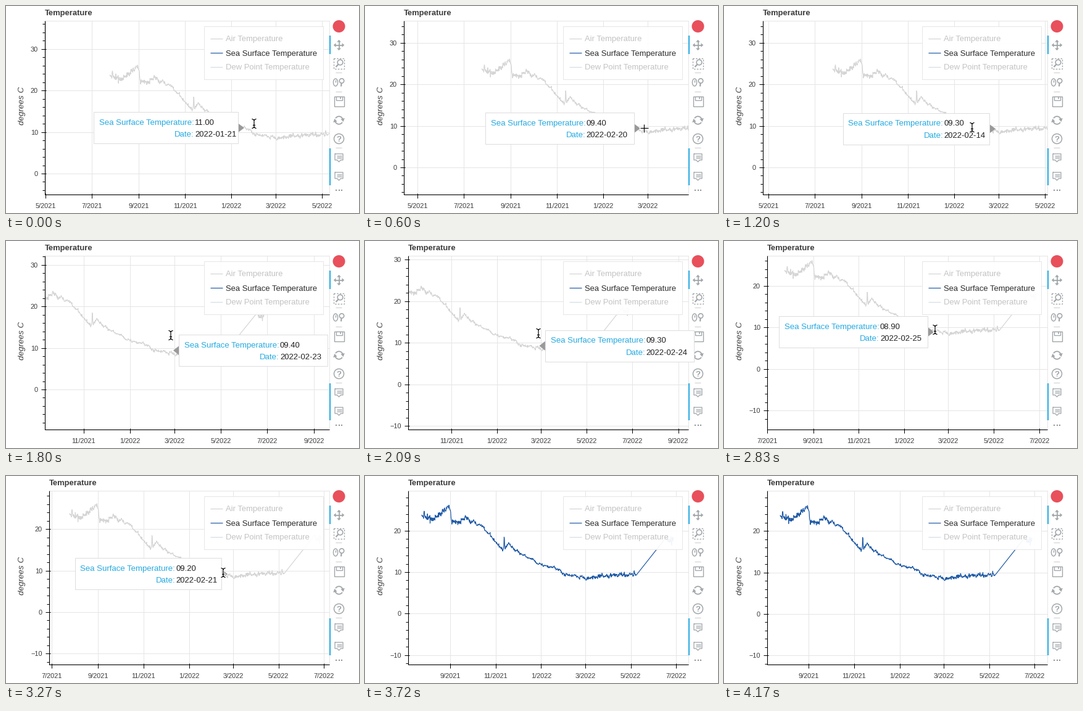
A matplotlib script that plays this animation: 572x336 px, repeating every 4.47 s.

```python
import numpy as np
import matplotlib.pyplot as plt
from matplotlib.animation import FuncAnimation
from matplotlib.patches import Circle, Polygon, Rectangle

W, H, DPI = 572, 336, 64
PT = 72 / DPI
LOOP, STEP, TICK = 4470, 149, 30
TOP, RIGHT, BOTTOM = 24, 524, 306
DEG = 6.74
INK, GRID, ICON, SKY = "#3c3c3c", "#e5e5e5", "#a1a6a9", "#26aae1"
MUTED, BLUE, FADED = "#d5d5d5", "#1f5aa6", "#c3c3c3"

plt.rcParams["font.family"] = "Liberation Sans"
fig = plt.figure(figsize=(W / DPI, H / DPI), dpi=DPI, facecolor="white")
ax = fig.add_axes([0, 0, 1, 1])
ax.set_xlim(0, W)
ax.set_ylim(H, 0)
ax.axis("off")


def stroke(x=(), y=(), color=ICON, lw=1.0, z=5, **kw):
    kw.setdefault("solid_capstyle", "butt")
    return ax.plot(x, y, color=color, lw=lw * PT, zorder=z, **kw)[0]


def label(x, y, s, size=11, color=INK, z=5, **kw):
    kw.setdefault("va", "baseline")
    return ax.text(x, y, s, fontsize=size * PT, color=color, zorder=z, **kw)


def box(x, y, w, h, fc="white", ec="none", z=5, lw=1, **kw):
    return ax.add_patch(Rectangle((x, y), w, h, fc=fc, ec=ec, zorder=z,
                                  lw=lw * PT, **kw))


def ring(x, y, r, lw=1.4):
    ax.add_patch(Circle((x, y), r, fc="none", ec=ICON, lw=lw * PT, zorder=5))


def shape(pts, color=ICON, z=5):
    return ax.add_patch(Polygon(pts, fc=color, ec="none", zorder=z))


def set_segments(line, segs):
    """Show separate segments (x0, y0, x1, y1) in one line artist."""
    xs, ys = [], []
    for x0, y0, x1, y1 in segs:
        xs += [x0, x1, np.nan]
        ys += [y0, y1, np.nan]
    line.set_data(xs, ys)


# ---- temperature series, days counted from the new year ----
NEW_YEAR = np.datetime64("2022-01-01")
TREND = np.array([
    (-160, 23.3), (-146, 22.8), (-132, 24.3), (-125, 26), (-122, 25.3),
    (-120, 21.9), (-111, 22), (-102, 23.2), (-92, 22), (-80, 21.2),
    (-52, 15.4), (-43, 16.6), (-38, 15.4), (-7, 12.6), (0, 11.6), (16, 11.2),
    (30, 9.6), (63, 8.3), (80, 9.1), (100, 9.2), (128, 9.5)])


def make_series():
    rng = np.random.RandomState(4)
    day = np.arange(-160.5, 127.8, 0.4)
    sigma = 0.12 + 0.32 * (day / 150) ** 2
    wander = np.convolve(rng.normal(size=day.size), np.ones(8) / 8, "same")
    temp = np.interp(day, *TREND.T) + 0.5 * wander
    temp += sigma * rng.normal(size=day.size)
    for at, rise in ((-157, 1.7), (-49.5, 3), (125, 0.9)):
        temp += rise * np.exp(-((day - at) / 0.5) ** 2)
    # steady climb over the gap, then a short noisy stretch
    later = np.arange(127.8, 178, 0.4)
    warm = np.minimum(9.35 + 0.227 * (later - 127.8), 18.7)
    noisy = later > 169
    warm[noisy] += 0.5 * rng.normal(size=noisy.sum()) - 1
    return np.append(day, later), np.append(temp, warm)


DAYS, TEMPS = make_series()


def make_months():
    for m in np.arange("2021-05", "2022-11", 2, dtype="datetime64[M]"):
        year, month = str(m).split("-")
        first = (m.astype("datetime64[D]") - NEW_YEAR).astype(int)
        yield f"{int(month)}/{year}", first


MONTHS = list(make_months())

# ---- motion keys ----
PAN = np.array([  # step, x of the new year, y of zero degrees
    (0, 365, 272), (1, 379, 267), (4, 386, 262), (7, 384, 262), (8, 373, 262),
    (12, 200.7, 241), (17, 266.3, 199), (20, 305, 212), (22, 296.6, 221),
    (23, 286, 223), (28, 284.7, 224)])
HOVER = np.array([  # step, tip x, day, degrees, pointer x, pointer y
    (0, 386, 20, 11.0, 402, 191), (4, 446, 50, 9.4, 452, 198),
    (8, 440, 44, 9.3, 402, 197), (12, 271, 53, 9.4, 267, 153),
    (17, 328, 58, 8.7, 335, 136), (22, 359, 51, 9.2, 352, 157)])
LEAVE = 25


def sample(keys, s):
    return [np.interp(s, keys[:, 0], col) for col in keys.T[1:]]


# ---- fixed parts ----
def draw_legend():
    box(321, 33, 193, 86, ec=GRID, z=4, alpha=0.95)
    rows = (("Air Temperature", FADED, MUTED),
            ("Sea Surface Temperature", "#2c2c2c", BLUE),
            ("Dew Point Temperature", FADED, "#d3dfe6"))
    for i, (name, text, line) in enumerate(rows):
        y = 53 + 23 * i
        stroke([331, 351], [y, y], line, 1.2)
        label(356, y + 4.5, name, 13, text)


def draw_pan(cx, cy):
    for dx, dy in ((1, 0), (-1, 0), (0, 1), (0, -1)):
        stroke([cx, cx + 6 * dx], [cy, cy + 6 * dy], lw=1.8)
        shape([(cx + r * dx + side * dy, cy + r * dy + side * dx)
               for r, side in ((8.7, 0), (5, 3.4), (5, -3.4))])


def draw_lens(x, y, r, dx, dy):
    ring(x, y, r, 1.6)
    stroke([x + dx * 0.45, x + dx], [y + dy * 0.45, y + dy], lw=2.2)


def draw_mouse(x, y):
    t = np.linspace(0, 2 * np.pi, 40)
    stroke(x + 3.6 * np.cos(t), y + 6 * np.sin(t), lw=1.4)
    stroke([x, x], [y - 4, y], lw=1.4)


def draw_disk(x, y):
    box(x - 8, y - 8, 16, 16, ec=ICON, lw=1.4)
    box(x - 5, y - 8, 10, 6, ec=ICON, lw=1.3)
    stroke([x + 2.5, x + 2.5], [y - 7, y - 4], lw=1.6)


def draw_reset(cx, cy):
    for d in (1, -1):
        t = np.linspace(0.2, 2.6, 24)
        stroke(cx + 6.3 * d * np.cos(t), cy - 6.3 * d * np.sin(t), lw=1.8)
        shape([(cx + 9.3 * d, cy - 3.5 * d), (cx + 3 * d, cy - 2 * d),
               (cx + 7 * d, cy + 2.6 * d)])


def draw_bubble(x, y):
    stroke(x + np.array([-6.5, 6.5, 6.5, 3, 0, -3, -6.5, -6.5]),
           y + np.array([-6, -6, 4, 4, 7, 4, 4, -6.6]), lw=1.3)
    for dy in (-3, -1, 1):
        stroke([x - 4, x + 4], [y + dy, y + dy])


def draw_toolbar():
    cx = 539.5
    ax.add_patch(Circle((cx, 33), 10, fc="#e8505b", ec="none", zorder=5))
    for y, h in ((48, 30), (231, 60)):
        box(524, y, 2, h, fc=SKY, lw=0)
    for y in (108, 139, 230):
        stroke([534, 544], [y, y], "#cccccc")
    draw_pan(cx, 63.5)
    box(531, 85, 17, 17, ec=ICON, lw=1.3, ls=(0, (2, 1.6)))
    draw_lens(cx + 2, 91.5, 4.3, -7, 7.5)
    draw_mouse(534, 124)
    draw_lens(544, 121.5, 3.7, -1, 9)
    draw_disk(cx, 155)
    draw_reset(cx, 185.5)
    ring(cx, 215.5, 8, 1.5)
    label(cx, 220, "?", 13, ICON, ha="center", weight="bold")
    for y in (246, 276):
        draw_bubble(cx, y)
    for dx in (-4.5, 0, 4.5):
        box(cx + dx - 1, 298, 2, 2, fc="#8c9194", lw=0)


draw_legend()
draw_toolbar()
label(26, 162, "degrees C", 13.4, style="italic", rotation=90, ha="center",
      va="center")

# ---- moving parts ----
grid = stroke(color=GRID, z=1)
frame = stroke(color=GRID, z=1)
series = stroke(color=MUTED, lw=1.2, z=2, solid_joinstyle="round")
axes_lines = stroke(color="black", lw=1.1, z=3)
ticks = stroke(color="black", z=3)
title = label(63, 15.5, "Temperature", 13, weight="bold")
month_labels = [label(0, 328, name, ha="center") for name, _ in MONTHS]
degree_labels = {v: label(0, 0, f"{v}".replace("-", "\u2212"), ha="right")
                 for v in range(-10, 41, 10)}

arrow = shape([(0, 0)] * 3, "#999999", 6)
tip_box = box(0, 0, 1, 1, ec="#dddddd", z=6)
tip_names = [label(0, 0, s, 13.3, SKY, 7, ha="right")
             for s in ("Sea Surface Temperature:", "Date:")]
tip_values = [label(0, 0, "", 13.1, "#222222", 7) for _ in range(2)]
halo = stroke(color="white", lw=3, z=8, solid_capstyle="projecting")
pointer = stroke(color="black", lw=1.2, z=9)
hover_parts = [arrow, tip_box, halo, pointer, *tip_names, *tip_values]


def draw_plot(jan, zero):
    # the axis moves over once a label with a minus sign shows
    left = 63 if zero + 10 * DEG > BOTTOM else 70
    scale = 1.2274 * (RIGHT - left) / 461
    grid_segs, tick_segs = [], []

    for (_, day), text in zip(MONTHS, month_labels):
        x = jan + day * scale
        inside = left - 0.5 <= x <= RIGHT
        text.set_visible(inside)
        text.set_x(x)
        if inside:
            grid_segs.append((x, TOP, x, BOTTOM))
            tick_segs.append((x, BOTTOM - 2, x, BOTTOM + 6))

    for v in range(-12, 42, 2):
        y = zero - v * DEG
        inside = TOP <= y <= BOTTOM
        major = v % 10 == 0
        if major:
            degree_labels[v].set_visible(inside)
            degree_labels[v].set_position((left - 11, y + 4))
        if inside and major:
            grid_segs.append((left, y, RIGHT, y))
            tick_segs.append((left - 6, y, left + 2, y))
        elif inside:
            tick_segs.append((left - 4, y, left, y))

    set_segments(grid, grid_segs)
    set_segments(ticks, tick_segs)
    set_segments(axes_lines, [(left, TOP, left, BOTTOM),
                              (left, BOTTOM, RIGHT, BOTTOM)])
    frame.set_data([left, RIGHT, RIGHT], [TOP, TOP, BOTTOM])
    title.set_x(left)

    x, y = jan + DAYS * scale, zero - TEMPS * DEG
    shown = (x > left) & (x < RIGHT) & (y > TOP) & (y < BOTTOM)
    series.set_data(np.where(shown, x, np.nan), np.where(shown, y, np.nan))


def draw_tooltip(x, y, day, temp):
    date = str(NEW_YEAR + int(round(day)))
    width = 241 - 3.7 * date.count("1")
    on_right = x < (63 + RIGHT) / 2
    base = x + 9.5 if on_right else x - 10
    x0 = base if on_right else base - width
    arrow.set_xy([(x, y), (base, y - 7.5), (base, y + 7.5)])
    tip_box.set_bounds(round(x0), round(y - 25.5), round(width), 51)
    rows = zip(tip_names, tip_values, (f"{round(temp, 1):05.2f}", date), (-5, 14.5))
    for name, value, text, dy in rows:
        name.set_position((x0 + 162.5, y + dy))
        value.set_position((x0 + 163.5, y + dy))
        value.set_text(text)


def draw_pointer(x, y, cross):
    if cross:
        segs = [(x - 6, y, x + 7, y), (x, y - 6, x, y + 7)]
    else:
        segs = [(x, y - 6.5, x, y + 6.5), (x - 2, y + 2.5, x + 2, y + 2.5)]
        segs += [(x, y + 6 * d, x + 3.5 * side, y + 7.8 * d)
                 for d in (-1, 1) for side in (-1, 1)]
    for line in (halo, pointer):
        set_segments(line, segs)


def update(i):
    s = min((i * TICK + TICK // 2) // STEP, 28)
    if s == 7:  # the view rests for one step
        s = 6
    jan, zero = sample(PAN, s)
    draw_plot(jan, zero)
    hovering = s < LEAVE
    series.set_color(MUTED if hovering else BLUE)
    for part in hover_parts:
        part.set_visible(hovering)
    if hovering:
        x, day, temp, px, py = sample(HOVER, s)
        draw_tooltip(x, zero - temp * DEG, day, temp)
        draw_pointer(round(px), round(py), 3 <= s <= 5)
    return []


anim = FuncAnimation(fig, update, frames=LOOP // TICK, interval=TICK,
                     repeat=True, repeat_delay=0)
plt.show()
```
